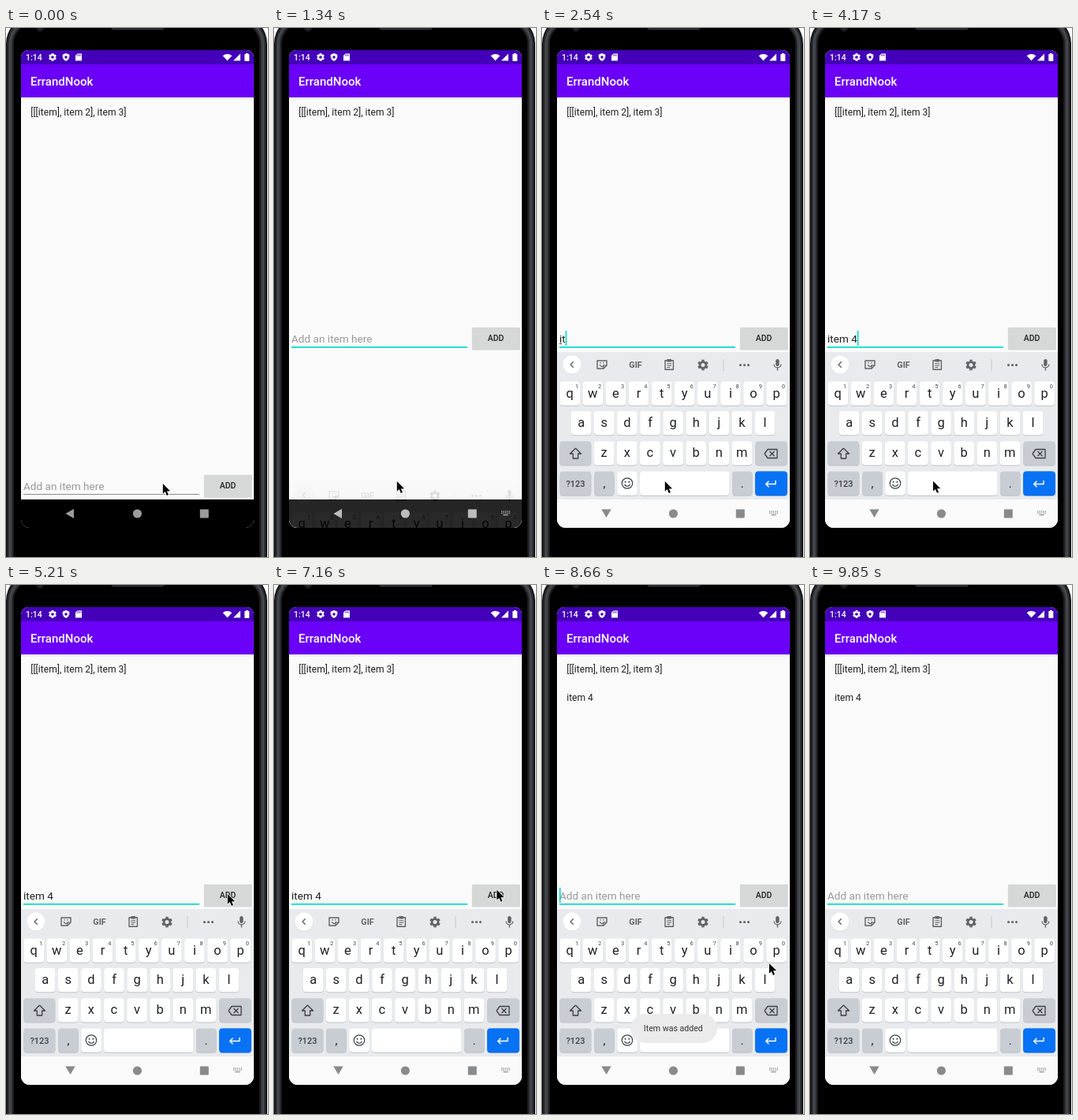
Animation, 332 px wide and 671 px high, one loop 9.95 s. Source, as an HTML page with a canvas:

```html
<!DOCTYPE html>
<html lang="en">
<head>
<meta charset="utf-8">
<title>List app</title>
<style>
html, body { margin: 0; width: 100%; height: 100%; overflow: hidden; background: #fff; }
canvas { display: block; width: 332px; height: 671px; }
</style>
</head>
<body>
<canvas id="stage"></canvas>
<script>
const W = 332, H = 671, LOOP = 9950, TICK = 149.25;
const FOCUS = 590, RESIZE = 1040, TYPE = 2380, TYPED = 3870, ADDED = 7310;
const FONT = 'Roboto, "Open Sans", sans-serif';
const TEAL = '#03dac5', INK = '#202124', ICON = '#5f6368', DARK = '#3c4043', GREY = '#c8ccd3';

const canvas = document.getElementById('stage');
const dpr = window.devicePixelRatio || 1;
canvas.width = W * dpr;
canvas.height = H * dpr;
const c = canvas.getContext('2d');

// pointer stops: time, x, y
const stops = [
  [0, 198, 577], [450, 155, 574], [4170, 155, 574], [4620, 309, 388], [5210, 280, 391],
  [7010, 280, 391], [7310, 283, 381], [8360, 283, 381], [9150, 296, 690]
];

const ramp = (t, a, b) => Math.min(1, Math.max(0, (t - a) / (b - a)));
const smooth = p => p * p * (3 - 2 * p);

// the screen refreshes in even ticks and rests while the button is awaited
function tick(t) {
  const awake = t > 5210 && t < 7160 ? 5210 : t;
  return Math.floor((awake + 17) / TICK) * TICK;
}

function pointerAt(t) {
  let [, x, y] = stops[0];
  for (let i = 1; i < stops.length; i++) {
    const p = smooth(ramp(t, stops[i - 1][0], stops[i][0]));
    x += (stops[i][1] - x) * p;
    y += (stops[i][2] - y) * p;
  }
  return [x, y];
}

function typedAt(t) {
  if (t < TYPE || t >= ADDED) return '';
  return 'item 4'.slice(0, 1 + Math.floor(5 * ramp(t, TYPE, TYPED) ** 0.65));
}

function caretOn(t) {
  const typing = t >= TYPE && t < TYPED + 500;
  return t >= FOCUS && (typing || (t + 650) % 1000 < 500);
}

function rect(x, y, w, h, color) {
  c.fillStyle = color;
  c.fillRect(x, y, w, h);
}

function round(x, y, w, h, r, color) {
  c.fillStyle = color;
  c.beginPath();
  c.roundRect(x, y, w, h, r);
  c.fill();
}

function disc(x, y, r, color) {
  c.fillStyle = color;
  c.beginPath();
  c.arc(x, y, r, 0, Math.PI * 2);
  c.fill();
}

function trace(pts, x = 0, y = 0) {
  c.beginPath();
  for (let i = 0; i < pts.length; i += 2) c.lineTo(x + pts[i], y + pts[i + 1]);
}

function poly(pts, color, x, y) {
  trace(pts, x, y);
  c.closePath();
  c.fillStyle = color;
  c.fill();
}

function line(pts, color, width, x, y) {
  trace(pts, x, y);
  c.strokeStyle = color;
  c.lineWidth = width;
  c.stroke();
}

function ring(x, y, r, color, width, from = 0, to = Math.PI * 2) {
  c.beginPath();
  c.arc(x, y, r, from, to);
  c.strokeStyle = color;
  c.lineWidth = width;
  c.stroke();
}

function text(s, x, y, size, color, weight = 400, align = 'left') {
  c.font = `${weight} ${size}px ${FONT}`;
  c.fillStyle = color;
  c.textAlign = align;
  c.fillText(s, x, y);
}

function gear(x, y, r, color) {
  ring(x, y, r * 0.58, color, r * 0.42);
  for (let i = 0; i < 6; i++) {
    const a = i * Math.PI / 3 + Math.PI / 6, u = Math.cos(a), v = Math.sin(a);
    line([u * r * 0.7, v * r * 0.7, u * r, v * r], color, r * 0.5, x, y);
  }
}

function face(x, y, r, color) {
  disc(x - r * 0.65, y - r * 0.4, r * 0.28, color);
  disc(x + r * 0.65, y - r * 0.4, r * 0.28, color);
  ring(x, y + r * 0.1, r, color, 1.2, 0.3, Math.PI - 0.3);
}

function clip(x, y, w, h, draw) {
  c.save();
  c.beginPath();
  c.rect(x, y, w, h);
  c.clip();
  draw();
  c.restore();
}

function phone() {
  rect(0, 0, W, H, '#fff');
  ['#141517', '#2c2e32', '#484b50', '#37393d', '#1c1d20', '#000'].forEach((color, i) => {
    const inset = i * 2;
    round(inset, inset - 16, 331 - inset * 2, 760, 36 - inset, color);
  });
  rect(0, 40, 2, H, '#141517');
  round(133, -6, 68, 8.5, 4, '#2a2b2e');
  disc(43, 0, 5, '#17181b');
  disc(43, 0, 2.5, '#24272d');
}

function statusBar() {
  rect(19, 28, 295, 18, '#4300b8');
  text('1:14', 25, 41.3, 10.5, '#fff', 500);
  gear(59, 37, 5, '#fff');
  poly([0, -5, 4.3, -3.2, 4.3, 0, 2.8, 3.2, 0, 5, -2.8, 3.2, -4.3, 0, -4.3, -3.2], '#fff', 76, 37);
  disc(76, 37, 1.8, '#4300b8');
  poly([-1.5, -4.5, 4, -4.5, 4, 4.5, -4, 4.5, -4, -2], '#fff', 92, 37);
  for (let i = 0; i < 3; i++) rect(90.2 + i * 1.8, 33.6, 0.9, 2, '#4300b8');
  c.beginPath();
  c.moveTo(280.5, 41.5);
  c.arc(280.5, 41.5, 8.5, -Math.PI * 0.74, -Math.PI * 0.26);
  c.fillStyle = '#fff';
  c.fill();
  poly([297, 32.5, 297, 41.5, 288, 41.5], '#fff');
  rect(304, 32, 2.6, 2, '#fff');
  round(302.3, 33, 6, 9, 0.8, '#fff');
}

function appBar() {
  for (let i = 0; i < 3; i++) rect(19, 88 + i, 295, 1, `rgba(0,0,0,${0.08 - i * 0.025})`);
  rect(19, 46, 295, 42, '#6a00f7');
  text('ErrandNook', 31, 73.3, 15, '#fff', 500);
}

function inputRow(t) {
  const y = t < RESIZE ? 581 : 394;
  const s = typedAt(t);
  text(s || 'Add an item here', 22, y + 5, 13.6, s ? '#212121' : '#999');
  const width = part => c.measureText(part).width;
  if (t < TYPED) rect(22, y + 6, width(s.slice(0, -1)), 1, '#444');
  if (t < FOCUS) rect(22, y + 10, 223, 1, '#8c8c8c');
  else rect(22, y + 10, 223, 1.7, TEAL);
  if (caretOn(t)) rect(22 + width(s), y - 10, 1.6, 19, TEAL);
  round(250.7, y - 14, 61.3, 29, 2, '#e6e6e6');
  round(251, y - 14.3, 60.7, 28.3, 1.5, '#d6d7d7');
  text('ADD', 281, y + 3.2, 10.5, '#212121', 500, 'center');
}

function key(x, y, w, color, shade = '#bfc3c8') {
  round(x, y + 1, w, 30.3, 4, shade);
  round(x, y, w, 30.3, 4, color);
}

function letters(row, x, y) {
  [...row].forEach((ch, i) => {
    const mid = x + i * 29.1;
    key(mid - 12.8, y, 25.6, '#fff');
    text(ch, mid, y + 20, 16.5, INK, 400, 'center');
  });
}

function tools() {
  disc(38, 427.6, 11.7, '#d4d7db');
  disc(38, 427, 11.5, '#fff');
  line([1.8, -3.7, -1.9, 0, 1.8, 3.7], ICON, 1.4, 38, 427);
  line([6, -1, 6, -5, -6, -5, -6, 5, 2, 5, 6, 1, 6, -1], ICON, 1.4, 76, 427);
  line([6, 1, 2, 1, 2, 5], ICON, 1.2, 76, 427);
  face(76, 426, 2.9, ICON);
  text('GIF', 118.5, 430.8, 10.8, ICON, 700, 'center');
  c.strokeStyle = ICON;
  c.lineWidth = 1.4;
  c.strokeRect(156, 421.7, 10.4, 11.6);
  rect(158.5, 420, 5.4, 3.5, ICON);
  for (let i = 0; i < 3; i++) rect(158.3, 425.3 + i * 2.4, i < 2 ? 5.8 : 4, 1, ICON);
  gear(204, 427.5, 6.8, ICON);
  rect(229.5, 420, 1, 15, '#c6c9ce');
  for (let i = 0; i < 3; i++) disc(251.5 + i * 5, 427.5, 1.5, ICON);
  round(296.2, 420, 4.4, 9, 2.2, ICON);
  ring(298.4, 426.5, 4.4, ICON, 1.3, 0, Math.PI);
  rect(297.8, 431, 1.3, 3.5, ICON);
}

function keyboard() {
  c.lineJoin = 'round';
  rect(19, 411, 295, 223, '#e8eaed');
  tools();
  letters('qwertyuiop', 35.2, 448.5);
  for (let i = 0; i < 10; i++) text((i + 1) % 10, 44 + i * 29.1, 456.8, 7.5, '#44474b', 400, 'center');
  letters('asdfghjkl', 49.7, 486);
  letters('zxcvbnm', 78.7, 524.3);

  key(22.4, 524.3, 40, GREY);
  line([0, -7, 7, 0, 3.2, 0, 3.2, 6, -3.2, 6, -3.2, 0, -7, 0, 0, -7], DARK, 1.3, 42.5, 540);
  key(270.3, 524.3, 40.4, GREY);
  line([-8, 0, -4, -5.5, 8, -5.5, 8, 5.5, -4, 5.5, -8, 0], DARK, 1.3, 290, 540);
  for (const s of [-1, 1]) line([-1.5, -3 * s, 4.5, 3 * s], DARK, 1.3, 290, 540);

  key(22.4, 562.4, 40, GREY);
  text('?123', 42.5, 582, 11, DARK, 500, 'center');
  key(66.2, 562.4, 25.6, GREY);
  text(',', 79, 583, 15, INK, 400, 'center');
  key(95.2, 562.4, 25.6, '#fff');
  ring(108, 577.5, 6.7, DARK, 1.2);
  face(108, 577.3, 3.6, DARK);
  key(124, 562.4, 113.5, '#fff');
  key(241, 562.4, 25.6, GREY);
  text('.', 253.8, 583, 15, INK, 400, 'center');
  key(270.2, 562.2, 40.6, '#0872f5', '#0664d8');
  line([6, -4, 6, 0.5, -6, 0.5], '#fff', 1.4, 290, 578);
  line([-2.5, -3.3, -6.3, 0.5, -2.5, 4.3], '#fff', 1.4, 290, 578);
}

function navIcons(color, open, keys) {
  if (open) poly([-6.2, -5, 6.2, -5, 0, 5.5], color, 81.5, 615.5);
  else poly([5, -6, 5, 6, -5.6, 0], color, 81, 616);
  disc(166.4, 616, 5.6, color);
  round(245.8, 610.6, 11, 11, 0.8, color);
  if (!keys) return;
  for (let i = 0; i < 10; i++) rect(288 + (i % 5) * 2.4, 612.5 + Math.floor(i / 5) * 2.2, 1.4, 1.2, color);
  rect(290.4, 617, 6.2, 1.2, color);
}

function imeAndNav(t) {
  if (t < RESIZE) {
    rect(19, 598, 295, 36, '#000');
    navIcons('#9b9b9b', false, false);
    return;
  }
  const shown = smooth(ramp(t, 1190, 1790));
  const keys = () => {
    c.translate(0, 198 * (1 - shown));
    keyboard();
  };
  clip(19, 380, 295, 218, () => {
    c.globalAlpha = shown;
    keys();
  });
  rect(19, 598, 295, 36, '#fafafa');
  if (shown < 1) {
    clip(19, 598, 295, 36, keys);
    rect(19, 598, 295, 36, `rgba(0,0,0,${1 - shown})`);
  }
  const open = shown > 0.4;
  navIcons(open ? '#888a8c' : '#bcbcbc', open, true);
}

function toast(t) {
  c.globalAlpha = ramp(t, 7370, 7770) * (1 - ramp(t, 9250, 9550));
  round(112, 544, 110, 37, 18.5, '#ebebeb');
  text('Item was added', 166.3, 566.2, 10.6, '#333', 400, 'center');
  c.globalAlpha = 1;
}

function arrow(x, y) {
  const shape = [0, 0, 0, 12.8, 2.9, 10.1, 5, 15, 7.1, 14.1, 5.1, 9.4, 9.2, 9.2];
  c.lineJoin = 'round';
  trace(shape.concat(0, 0), x + 0.8, y + 1);
  c.strokeStyle = '#fff';
  c.lineWidth = 1.6;
  c.stroke();
  poly(shape, '#000', x + 0.8, y + 1);
}

function draw(t) {
  c.setTransform(dpr, 0, 0, dpr, 0, 0);
  phone();
  c.save();
  c.beginPath();
  c.roundRect(19, 28, 295, 606, [9, 9, 11, 11]);
  c.clip();
  rect(19, 28, 295, 606, '#fafafa');
  statusBar();
  appBar();
  text('[[[item], item 2], item 3]', 31.2, 110.6, 12.1, '#212121');
  if (t >= ADDED) text('item 4', 31.2, 146.8, 12.1, '#212121');
  inputRow(t);
  imeAndNav(t);
  toast(t);
  c.restore();
  arrow(...pointerAt(t));
}

const start = performance.now();
function loop() {
  draw(tick((performance.now() - start) % LOOP));
  requestAnimationFrame(loop);
}
loop();
</script>
</body>
</html>
```
